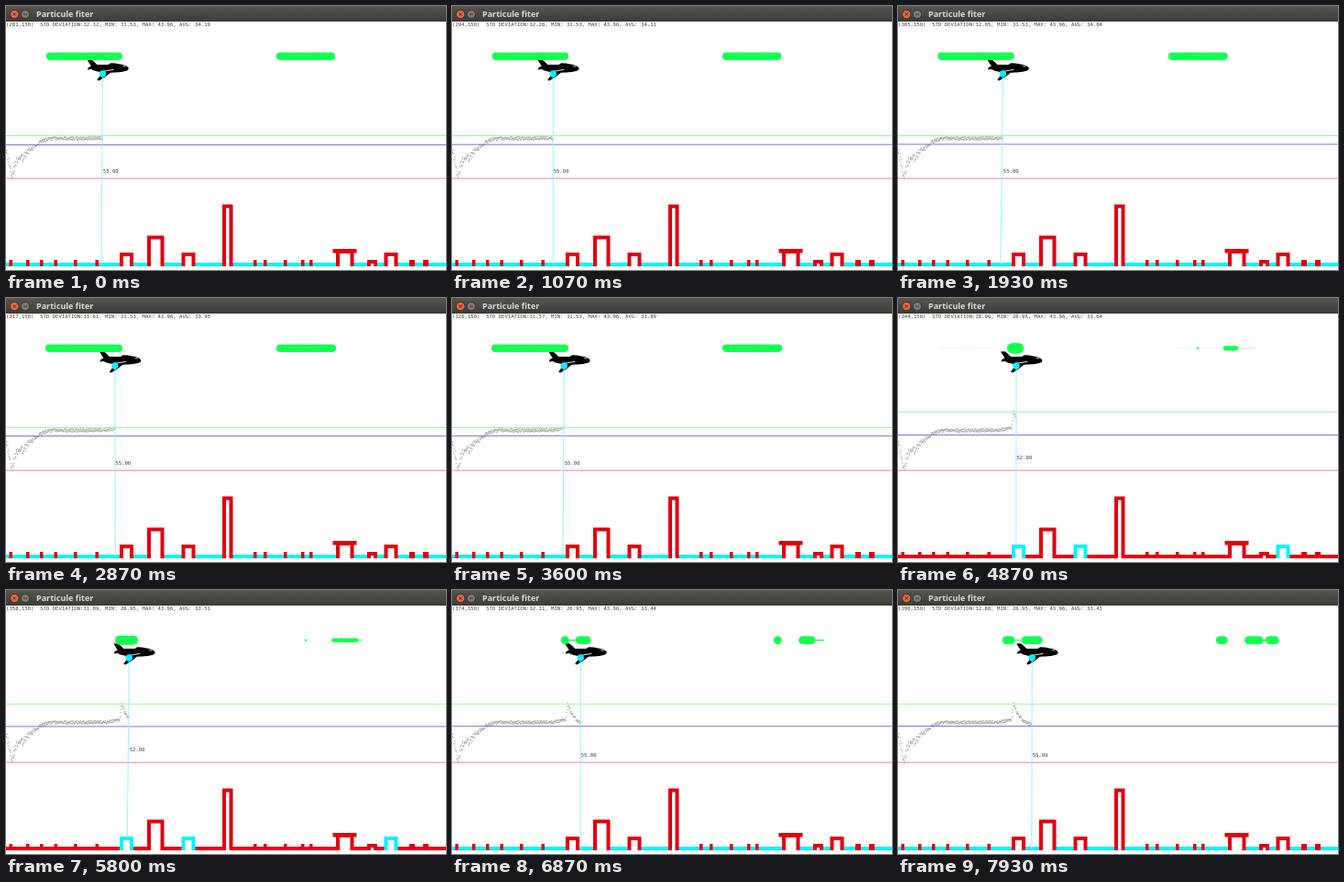
Write an HTML page with a canvas that moves like this. It is 480 px wide and 288 px high and loops after 8000 ms.

```html
<!DOCTYPE html>
<html>
<head>
<meta charset="utf-8">
<style>
  html, body { margin: 0; width: 100%; height: 100%; overflow: hidden; background: #fff; }
  canvas { display: block; }
</style>
</head>
<body>
<canvas id="stage" width="480" height="288"></canvas>
<script>
const ctx = document.getElementById('stage').getContext('2d');
const LOOP = 8000, SCALE = 0.375;
const GROUND = 280, GROUND_END = 284, SWARM_Y = 54.8;
const START = 281, ENTER = 331, PEAK = 336, LEAVE = 370;
const START_AVG = 34.19, START_MIN = 31.53, MAX = 43.96;
const RED = '#e2000f', CYAN = '#00f4ff', GREEN = '#12ff50';
const MONO = '5.625px "DejaVu Sans Mono", monospace';

// Obstacles: left, right, top
const BLOCKS = [
  [124, 139, 269], [154, 172.5, 250.5], [191.5, 206.5, 269], [236, 247.5, 216.5],
  [360, 379.5, 266], [394, 405, 277], [412.5, 427.5, 269]
];
const TICKS = [3.5, 22, 37, 52.5, 74, 97.5, 270, 281, 303, 322, 331, 440, 455];

const mix = (a, b, k) => a + (b - a) * k;
const clamp01 = k => Math.min(1, Math.max(0, k));
const chartY = value => 23.26 + value * 3.75;

function noise(i) {
  const v = Math.sin(i * 127.1 + 11.7) * 43758.5453;
  return (v - Math.floor(v)) * 2 - 1;
}

// The simulation speeds up once the plane reaches the first block.
function stepAt(time) {
  const rate = time < 4070 ? 0.01254 : 0.01503;
  return Math.floor(332.05 + (time - 4070) * rate);
}

function deviation(i) {
  if (i < START) {
    const spike = 4.7 * Math.exp(-(((i - 18) / 6) ** 2));
    return 32.32 + 6.9 * Math.exp(-((i / 80) ** 3)) + spike - 4 * Math.exp(-i / 6);
  }
  if (i <= ENTER) return 32.32 - Math.min(0.75, 0.71 * ((i - START) / 36) ** 2.4);
  if (i <= PEAK) return 31.425 - 0.895 * (i - ENTER);
  return 33.4 - 6.45 * Math.exp((PEAK - i) / 21.4);
}

function statistics(step) {
  let sum = START * START_AVG, min = START_MIN;
  for (let i = START + 1; i <= step; i++) {
    sum += deviation(i);
    min = Math.min(min, deviation(i));
  }
  return { min, avg: sum / step };
}

function rect(color, x, y, w, h) {
  ctx.fillStyle = color;
  ctx.fillRect(x, y, w, h);
}

function disc(color, x, y, r) {
  ctx.fillStyle = color;
  ctx.beginPath();
  ctx.arc(x, y, r, 0, Math.PI * 2);
  ctx.fill();
}

function line(color, width, x1, y1, x2, y2) {
  ctx.strokeStyle = color;
  ctx.lineWidth = width;
  ctx.beginPath();
  ctx.moveTo(x1, y1);
  ctx.lineTo(x2, y2);
  ctx.stroke();
}

function text(str, x, y, font, color) {
  ctx.font = font;
  ctx.fillStyle = color;
  ctx.fillText(str, x, y);
}

function drawTitleBar() {
  const shade = ctx.createLinearGradient(0, 0, 0, 17);
  shade.addColorStop(0, '#57554e');
  shade.addColorStop(1, '#3c3b37');
  rect(shade, 0, 0, 480, 17);
  for (const [x, color] of [[9.3, '#e9663f'], [21, '#7b7870']]) {
    disc('#32312d', x, 9, 5);
    disc(color, x, 9, 4.3);
  }
  line('#5a2a18', 1, 7.7, 7.4, 10.9, 10.6);
  line('#5a2a18', 1, 10.9, 7.4, 7.7, 10.6);
  line('#3c3b37', 1, 19, 9.2, 23, 9.2);
  text('Particule fiter', 33, 12.3, 'bold 9px "Noto Sans", "Open Sans", sans-serif', '#dfdbd2');
}

function drawGround(overBlock) {
  rect(overBlock ? RED : CYAN, 0, GROUND, 480, GROUND_END - GROUND);
  for (const x of TICKS) rect(RED, x, 277, x > 400 ? 6 : 3.5, GROUND_END - 277);
  for (const [left, right, top] of BLOCKS) {
    const color = overBlock && top === 269 ? CYAN : RED;
    rect(color, left, top, right - left, GROUND_END - top);
    rect('#fff', left + 4, top + 4, right - left - 8, GROUND_END - top - 4);
  }
  rect(RED, 356.5, 265, 26, 4.5);
}

function drawTrace(step) {
  for (let i = 0; i <= step; i++) {
    const spread = 0.5 + 0.9 * Math.exp(-((i / 80) ** 4));
    const y = chartY(Math.min(MAX, deviation(i) + noise(i) * spread));
    rect('#a4a4a4', i * SCALE - 0.5, y - 0.5, 1.1, 1.1);
  }
}

// A crowd of overlapping particles of equal weight between x1 and x2.
function swarm(x1, x2, r) {
  const count = Math.ceil((x2 - x1) / 1.6);
  for (let i = 0; i <= count; i++) {
    const inner = i > 0 && i < count;
    const x = mix(x1, x2, (i + (inner ? noise(i) * 0.9 : 0)) / Math.max(1, count));
    disc(GREEN, x, SWARM_Y, r);
  }
}

function thread(x1, x2, width) {
  line(GREEN, width, x1, SWARM_Y, x2, SWARM_Y);
}

function drawParticles(step) {
  if (step < ENTER) {
    const k = clamp01((step - START) / 36);
    swarm(48 - k, 123, 4.1);
    swarm(299, 355 + k, 4.1);
  } else if (step <= LEAVE) {
    // Particles over a block gain weight, the others fade, then the crowd evens out.
    const k = clamp01((step - 332) / 26);
    const weight = Math.exp(-Math.max(0, step - 332) / 4);
    for (const [start, length] of [[45, 62], [301, 49]]) {
      thread(start, start + length, 1.7 * weight);
      for (let i = 0; i < 3; i++) swarm(start + 6 + i * length / 3, start + 10 + i * length / 3, 2.5 * weight);
    }
    thread(354, 389, 0.8 * k);
    disc(GREEN, 327, SWARM_Y, 1.3);
    swarm(125 - k, mix(125, 139, k), 5 + 12.5 * weight);
    swarm(357 + k, mix(357, 382, k), 2.4 + 4.4 * weight);
  } else {
    const k = clamp01((step - 374) / 16);
    swarm(123 - 5 * k, 123.5, 4.2);
    swarm(139, 147.5 + 6 * k, 4.2);
    swarm(355 - 4 * k, 355.5, 4.2);
    swarm(382.3, 392.3 + 2 * k, 4.2);
    thread(123, 139, 1.4 * (1 - k));
    thread(392, 406, 2 * k);
    swarm(405, 411.5, 4.2 * Math.sqrt(k));
  }
}

const BODY = new Path2D(
  'M-17 -15.5 L-12.5 -15.8 L-9.5 -13.5 L-6 -10 L6 -10 L9 -11.8 L14 -11.5 L19 -10.6 ' +
  'Q25 -10 28 -7 Q29.3 -4.6 26 -3.2 Q20 -1.4 13 -1.6 L8.5 -1.2 Q2 4.6 -4 7.4 L-6 6.6 L0 -1.6 ' +
  'Q-9 -2.5 -12 -5 L-16.5 -4.5 L-15.5 -7 L-12.5 -8.5 Z');

function drawPlane(x) {
  ctx.save();
  ctx.translate(x, 74);
  ctx.fillStyle = '#000';
  ctx.fill(BODY);
  line('#fff', 0.9, 0, -2.6, 12, -4.6);
  line('#fff', 0.8, 22, -8.6, 25, -7.8);
  ctx.restore();
}

function draw(time) {
  const step = stepAt(time);
  const x = step * SCALE;
  const overBlock = step >= ENTER && step <= LEAVE;
  const { min, avg } = statistics(step);

  rect('#fff', 0, 0, 480, 288);
  drawTrace(step);
  for (const [value, color] of [[min, '#9bf79b'], [avg, '#7a74d8'], [MAX, '#ea8097']])
    line(color, 1, 0, chartY(value), 480, chartY(value));
  drawGround(overBlock);
  drawPlane(x);
  line('#93f6ff', 1, x, 74, x - 1 + noise(step) * 1.5, overBlock ? 270 : 282);
  drawParticles(step);
  disc(CYAN, x, 74, 3.7);

  text(overBlock ? '52.00' : '55.00', x + 0.4, overBlock ? 176 : 182, MONO, '#444');
  text(`(${step},150)  STD DEVIATION:${deviation(step).toFixed(2)}, MIN: ${min.toFixed(2)}, ` +
    `MAX: ${MAX.toFixed(2)}, AVG: ${avg.toFixed(2)}`, 0, 22, MONO, '#444');
  drawTitleBar();
}

function tick() {
  draw(performance.now() % LOOP);
  requestAnimationFrame(tick);
}
tick();
</script>
</body>
</html>
```
